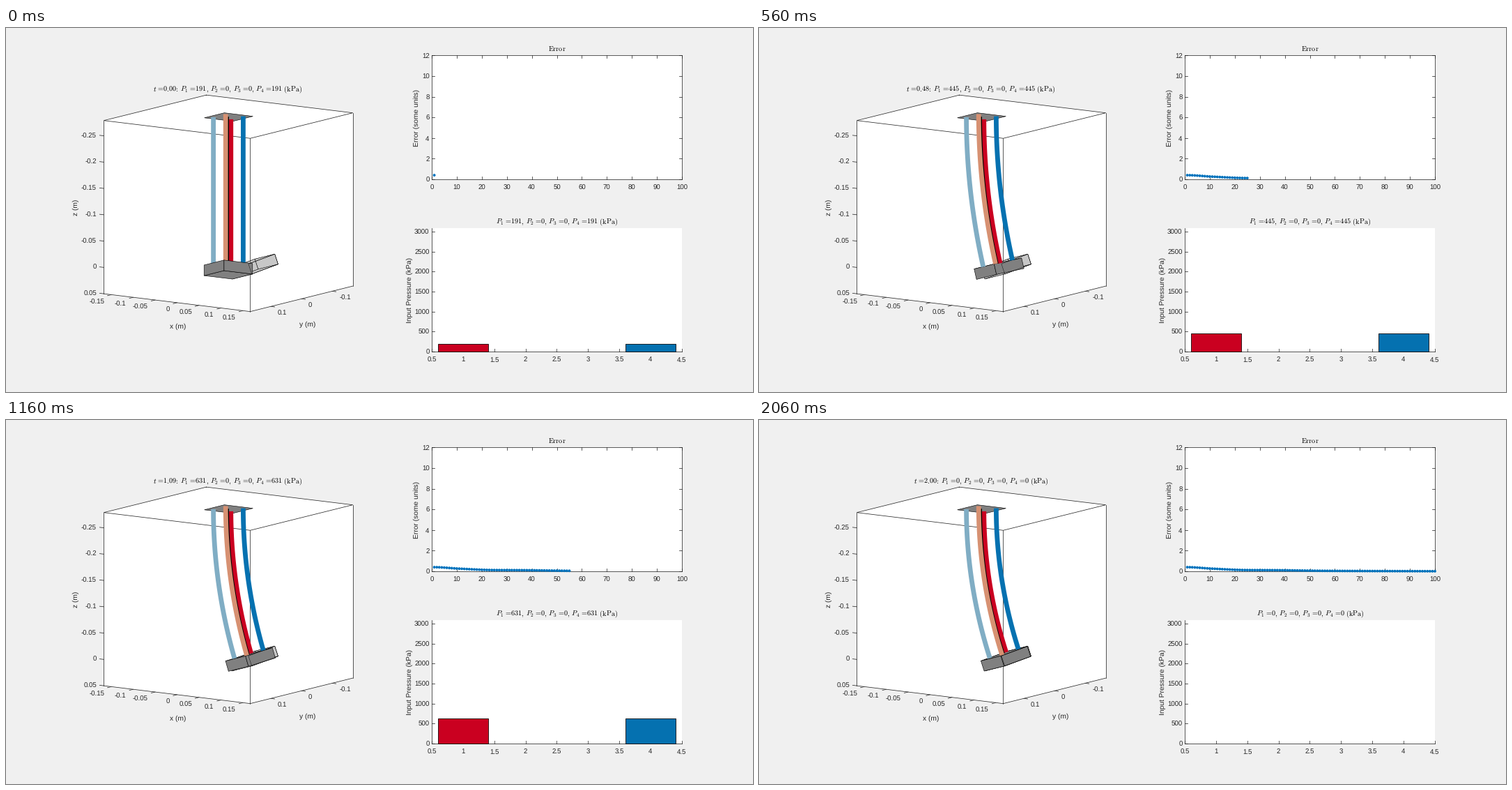
A matplotlib script for the animation above (2.08 s loop, 1072 px wide and 522 px high).

```python
import numpy as np
import matplotlib.pyplot as plt
from matplotlib.animation import FuncAnimation
from matplotlib.collections import LineCollection, PolyCollection
from matplotlib.patches import Rectangle

plt.rcParams.update({"font.family": "Liberation Sans",
                     "mathtext.fontset": "cm",
                     "text.hinting": "none"})

W, H, DPI = 1072, 522, 64
PX = 72 / DPI                      # points per pixel
INK = "#262626"
RED, ORANGE, SKY, BLUE = "#ca0020", "#d79172", "#80adc4", "#0571b0"
STEPS, HOLD = 100, 4

fig = plt.figure(figsize=(W / DPI, H / DPI), dpi=DPI, facecolor="#f0f0f0")
ax = fig.add_axes([0, 0, 1, 1])
ax.set_xlim(0, W)
ax.set_ylim(H, 0)
ax.axis("off")


def line(xs, ys, color=INK, lw=0.75, z=2, **kw):
    return ax.plot(xs, ys, color=color, lw=lw * PX, zorder=z, **kw)[0]


def label(x, y, s, ha="center", size=9.6, rot=0):
    """Text whose digits are centred vertically on y (or on x if turned)."""
    off = 0.36 * size
    x, y = (x + off, y) if rot else (x, y + off)
    ax.text(x, y, s, ha=ha, va="baseline", fontsize=size * PX, color=INK,
            rotation=rot, rotation_mode="anchor", zorder=6)


def heading(x, y, s):
    return ax.text(x, y, s, ha="center", va="baseline", color="black",
                   fontsize=10.2 * PX, zorder=6)


def smooth(keys, vals, start):
    """Monotone cubic through the given points, sampled at every step."""
    k, v = np.array(keys, float), np.array(vals, float)
    h = np.diff(k)
    d = np.diff(v) / h
    m = np.r_[start, 2 * d[:-1] * d[1:] / (d[:-1] + d[1:]), d[-1]]
    t = np.arange(keys[-1] + 1.0)
    i = np.clip(np.searchsorted(k, t, side="right") - 1, 0, len(h) - 1)
    u = (t - k[i]) / h[i]
    return (v[i] * (1 + 2 * u) * (1 - u) ** 2 + v[i + 1] * u * u * (3 - 2 * u)
            + h[i] * u * (1 - u) * (m[i] * (1 - u) - m[i + 1] * u))


# ---- motion ---------------------------------------------------------------
GOAL = 0.39
bend = smooth([0, 10, 24, 35, 54, 68, 99],
              [0, 0.138, 0.273, 0.284, 0.343, 0.360, 0.381], 0)
error = 0.4 * (1 - bend / GOAL)
pressure = np.zeros(STEPS)
pressure[:75] = smooth([0, 10, 24, 35, 54, 68, 74],
                       [191, 340, 445, 533, 631, 676.3, 692], 18)

# ---- 3D view --------------------------------------------------------------
LIM, TOP, BOTTOM = 0.167, -0.279, 0.05
HALF, THICK, REACH = 0.0325, 0.02, 0.02
RING = np.array([(-1, -1), (1, -1), (1, 1), (-1, 1)])


def project(x, y, z):
    x, y, z = np.broadcast_arrays(x, y, z)
    return np.stack([319 + 629 * x - 440.5 * y,
                     127.2 + 76.5 * x + 109.4 * y + 755 * (z - TOP)], -1)


def arm_point(theta, s, dx=0, dy=0, dz=0):
    """Point at share s along the bent arm, shifted in its local frame."""
    length = 0.2804 - 0.0255 * theta ** 2
    a = np.maximum(theta * s, 1e-6)
    reach = length * s
    x = reach * (1 - np.cos(a)) / a + dx * np.cos(a) + dz * np.sin(a)
    z = reach * np.sin(a) / a - dx * np.sin(a) + dz * np.cos(a)
    return project(x, dy, TOP + z)


def block(theta):
    cx, cy = HALF * RING.T
    return [arm_point(theta, 1.0, cx, cy, dz) for dz in (0, THICK)]


def side(top, low, i):
    j = (i + 1) % 4
    return np.array([top[i], top[j], low[j], low[i]])


roof = project(*(LIM * RING.T), TOP)
floor = project(*(LIM * RING.T), BOTTOM)
hull = np.array([roof[3], roof[0], roof[1], floor[1], floor[2], floor[3]])
ax.fill(*hull.T, color="white", lw=0, zorder=1)
line(*np.vstack([roof, roof[:1]]).T)
line(*floor[1:].T)
for i in (1, 2, 3):
    line(*np.array([roof[i], floor[i]]).T)

for v in (-0.15, -0.1, -0.05, 0, 0.05, 0.1, 0.15):
    px, py = project(v, LIM, BOTTOM)
    line([px, px - 5.5], [py, py + 1.4])
    label(px - 10, py + 9.7, f"{v:g}", "right")
for v in (0.1, 0, -0.1):
    px, py = project(LIM, v, BOTTOM)
    line([px, px + 5.5], [py, py + 0.7])
    label(px + 10, py + 8.7, f"{v:g}", "left")
for v in (-0.25, -0.2, -0.15, -0.1, -0.05, 0, 0.05):
    px, py = project(-LIM, LIM, v)
    line([px, px - 6], [py, py - 0.7])
    label(130, py - 0.6, f"{v:g}", "right")
label(247, 427, "x (m)", size=10.2)
label(433, 424.5, "y (m)", size=10.2)
label(99.5, 257, "z (m)", size=10.2, rot=90)

GRAY = (0.5, 0.5, 0.5, 1)


def faces(polys, fill, z, lw=0.6):
    shape = PolyCollection(polys, facecolor=fill, edgecolor="black",
                           linewidth=lw * PX, zorder=z)
    ax.add_collection(shape)
    return shape


faces([project(*(HALF * RING.T), TOP)], GRAY, 2.5)
g_top, g_low = block(GOAL)
g_sides = [side(g_top, g_low, i) for i in range(4)]
faces([g_top, g_low] + g_sides, (0.5, 0.5, 0.5, 0.25), 3, 0.4)
faces([g_sides[0]], "none", 4.2, 0.4)
platform = faces([g_top], GRAY, 4)

# far to near: colour, width, local offsets
RODS = [(RED, 6.8, 1, 1), (SKY, 6.8, -1, 1), ("black", 2, 0, 0),
        (BLUE, 6.8, 1, -1), (ORANGE, 6.8, -1, -1)]
rods = [line([], [], c, w, solid_capstyle="butt", snap=False)
        for c, w, _, _ in RODS]
along = np.linspace(0, 1, 30)

# ---- error plot -----------------------------------------------------------
LEFT, RIGHT = 611, 970


def panel(y0, y1):
    ax.add_patch(Rectangle((LEFT, y0), RIGHT - LEFT, y1 - y0,
                           fc="white", ec="none", zorder=1))


def err_xy(n, e):
    return LEFT + 3.59 * n, 217 - 14.8 * e


panel(39, 217)
line([LEFT, RIGHT, RIGHT, LEFT, LEFT], [39, 39, 217, 217, 39])
for n in range(0, 101, 10):
    x = err_xy(n, 0)[0]
    line([x, x], [217, 213])
    line([x, x], [39, 43])
    label(x, 228, str(n))
for e in range(0, 13, 2):
    y = err_xy(0, e)[1]
    line([LEFT, LEFT + 4], [y, y])
    line([RIGHT, RIGHT - 4], [y, y])
    label(607.5, y + 0.5, str(e), "right")
label(588.5, 128.5, "Error (some units)", size=10.2, rot=90)
heading(790.5, 34, r"$\mathrm{Error}$")

# tiny round-capped strokes keep the dots at subpixel positions
dots = LineCollection([], colors="#0072bd", linewidths=4 * PX,
                      capstyle="round", snap=False, zorder=5)
ax.add_collection(dots, autolim=False)

# ---- pressure plot --------------------------------------------------------
BASE, PER_KPA, PER_BAR = 464, 0.0574, 89.7

panel(287, BASE)
line([LEFT, LEFT, RIGHT], [287, BASE, BASE])
for n in range(9):
    x = LEFT + n * PER_BAR / 2
    line([x, x], [BASE, BASE - 4])
    label(x, 475, f"{0.5 + n / 2:g}")
for p in range(0, 3001, 500):
    y = BASE - PER_KPA * p
    line([LEFT, LEFT + 4], [y, y])
    label(607.5, y + 0.5, str(p), "right")
label(578.5, 376, "Input Pressure (kPa)", size=10.2, rot=90)

bars = []
for n, c in ((1, RED), (4, BLUE)):
    bars.append(Rectangle((LEFT + (n - 0.9) * PER_BAR, BASE), 0.8 * PER_BAR, 0,
                          fc=c, ec="black", lw=0.8 * PX, zorder=3))
    ax.add_patch(bars[-1])

title = heading(318.5, 91, "")
subtitle = heading(791, 281.5, "")
EQ = r"\hspace{0.1}=\!"


def draw(tick):
    k = max(0, tick - HOLD)
    theta = bend[k]

    top, low = block(theta)
    top_seen = top[0, 1] > top[2, 1]
    platform.set_verts([top if top_seen else low,
                        side(top, low, 3), side(top, low, 0)])
    for i, (rod, (_, _, sx, sy)) in enumerate(zip(rods, RODS)):
        pts = arm_point(theta, along, sx * REACH, sy * REACH)
        rod.set_data(*pts.T)
        rod.set_zorder((4.5 if top_seen else 3.5) + 0.05 * i)

    n = np.arange(k + 1)
    xy = np.stack(err_xy(n + 1, error[n]), -1)
    dots.set_segments(np.stack([xy - (0.01, 0), xy + (0.01, 0)], 1))

    p1 = pressure[k]
    p4 = p1 + 0.005 * k if p1 else 0
    for bar, p in zip(bars, (p1, p4)):
        bar.set_height(-PER_KPA * p)
        bar.set_visible(p > 0)
    parts = [f"P_{i}{EQ}{p:.0f}" for i, p in enumerate((p1, 0, 0, p4), 1)]
    inputs = r",\,".join(parts) + r"\ (\mathrm{kPa})"
    time = 2 * k / (STEPS - 1)
    title.set_text(rf"$t{EQ}{time:.2f}\!:\,{inputs}$")
    subtitle.set_text(f"${inputs}$")
    return [platform, dots, title, subtitle, *rods, *bars]


anim = FuncAnimation(fig, draw, frames=STEPS + HOLD, interval=20,
                     init_func=lambda: draw(0), repeat=True, blit=False)
plt.show()
```
